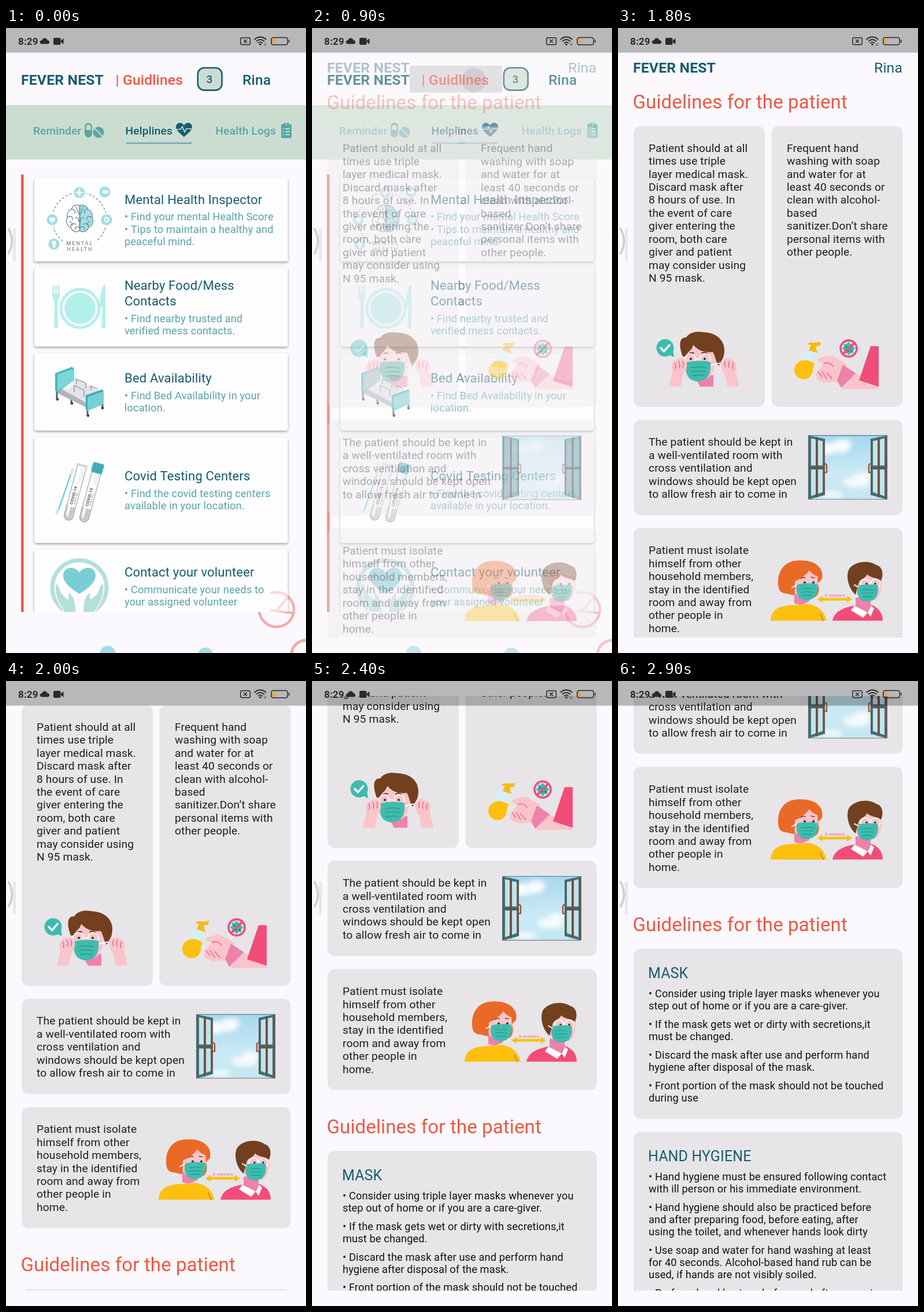
An HTML page with a canvas for the animation above (3000 ms loop, 519 px wide and 1079 px high).

```html
<!DOCTYPE html>
<html lang="en">
<head>
<meta charset="utf-8">
<title>Care app guidelines</title>
<style>
html, body { margin: 0; width: 100%; height: 100%; overflow: hidden; background: #fbf9fd; }
canvas { display: block; width: 519px; height: 1079px; }
</style>
</head>
<body>
<canvas id="stage" width="519" height="1079"></canvas>
<script>
const W = 519, H = 1079, LOOP = 3000;
const BG = '#fbf9fd', NAVY = '#175c72', TEAL = '#5aa5a6', RED = '#ef5744', BAND = '#cbddd0';
const SKIN = '#fbc4ca', HAIR = '#72401f', MASK = '#3fbcae', PINK = '#f24d79', BLUSH = '#ee82ab', YELLOW = '#fdc00f';
const BRAND = 'FEVER NEST', USER = 'Rina';
const c = document.getElementById('stage').getContext('2d');

function text(s, x, cy, size, color, weight = 400, align = 'left', gap = 0.13) {
  c.font = `${weight} ${size}px Roboto, sans-serif`;
  c.letterSpacing = gap + 'px';
  c.textAlign = align;
  c.fillStyle = color;
  c.fillText(s, x, cy + size * 0.355);
}
function lines(list, x, cy, step, size, color) {
  list.forEach((s, i) => text(s, x, cy + i * step, size, color));
}
function fill(d, color) { c.fillStyle = color; c.fill(new Path2D(d)); }
function line(d, color, w = 1) {
  c.strokeStyle = color;
  c.lineWidth = w;
  c.lineCap = c.lineJoin = 'round';
  c.stroke(new Path2D(d));
}
function disc(x, y, r, color, ry = r) {
  c.fillStyle = color;
  c.beginPath(); c.ellipse(x, y, r, ry, 0, 0, 7); c.fill();
}
function ring(x, y, r, color, w) {
  c.strokeStyle = color; c.lineWidth = w;
  c.beginPath(); c.arc(x, y, r, 0, 7); c.stroke();
}
function box(x, y, w, h, r, color) {
  c.fillStyle = color;
  c.beginPath(); c.roundRect(x, y, w, h, r); c.fill();
}
function clipped(x, y, w, h, draw) {
  c.save();
  c.beginPath(); c.rect(x, y, w, h); c.clip();
  draw();
  c.restore();
}

/* ---------- home screen ---------- */
function mental() {
  c.setLineDash([4, 3]);
  c.lineCap = 'butt';
  ring(127, 331, 47, '#75848a', 1.2);
  c.setLineDash([]);
  c.fillStyle = '#fefdff';
  c.fillRect(98, 364, 58, 24);
  [[127, 284], [171, 283], [174, 331], [80, 331], [83, 373]].forEach(([x, y]) => {
    disc(x, y, 12, '#fefdff');
    disc(x, y, 9.5, '#a6dbe3');
  });
  line('M127 279V289M122 284H132', '#fff', 3);
  box(166, 280, 11, 6, 3, '#fff');
  ring(174, 331, 3.5, '#fff', 2.4);
  fill('M80 336C72 331 75 325 80 328C85 325 88 331 80 336Z', '#fff');
  disc(83, 371, 3.8, '#fff');
  c.fillStyle = '#fff'; c.fillRect(81, 374, 4, 5);
  fill('M128 306C136 304 141 309 142 313C149 316 149 324 149 327C153 335 148 343 143 344C141 351 132 354 128 350Z', '#a5dce4');
  const half = 'M127 306C119 304 114 309 113 313C106 316 105 323 106 327C102 335 107 343 112 344C114 351 123 354 127 350Z';
  const folds = 'M113 313C118 312 121 316 119 320M106 327C111 323 116 326 115 331M112 344C111 338 117 336 121 339M121 309C125 314 123 318 126 321M109 334C114 334 115 337 115 341M120 328C124 326 126 330 126 334M120 348C118 344 122 342 126 344';
  line(half + folds, '#6d7a80', 1.2);
  c.save();
  c.translate(255, 0); c.scale(-1, 1);
  line(half + folds, '#5e8f99', 1.2);
  c.restore();
  text('MENTAL', 128, 372, 9, '#6b7478', 400, 'center', 2);
  text('HEALTH', 128, 382, 9, '#6b7478', 400, 'center', 2);
}
function plate() {
  const a = '#b3f0ec';
  ring(128, 484, 33, a, 5);
  disc(128, 484, 27, a);
  line('M82 446V463M86.500 446V463M91 446V463', a, 2.6);
  fill('M80 459H93C93 468 89 470 89 474L90 517Q86.500 521 83 517L84 474C84 470 80 468 80 459Z', a);
  fill('M171 443C164 449 162 466 163 482H167L165 516Q168 521 172 517V443Z', a);
}
function bed() {
  line('M88 625V640M118 608V622M141 655V669M167 645V657M113 637V648', '#5b6469', 3);
  fill('M90 620L119 604L167 630L141 648Z', '#e3e4e8');
  fill('M90 620L141 648V656L90 631Z', '#aeb4ba');
  fill('M92 618L107 609L122 615L106 626Z', '#f3f3f6');
  fill('M85 596L114 585L118 588V607L89 629L85 626Z', '#45b9c0');
  fill('M89 598L118 588V607L89 627Z', '#7bd5d9');
  fill('M138 634L166 624L169 627V649L141 661L138 658Z', '#3fa9b1');
  fill('M141 637L169 627V649L141 661Z', '#74d0d5');
  line('M118 628V617L135 625V636M122 614V606L138 613V622M147 625V618L158 623', '#a2a8ad', 1.8);
  [[89, 641], [142, 669], [167, 656], [114, 648]].forEach(([x, y]) => disc(x, y, 2.4, '#42494d'));
}
function tube(x, y, cap) {
  c.save();
  c.translate(x, y);
  c.rotate(0.265);
  box(-8, 0, 16, 98, [1, 1, 8, 8], '#f3f3f5');
  fill('M-8 72H8V90A8 8 0 0 1 -8 90Z', '#c9cacd');
  fill('M-5 2H-1V92Q-4 92 -5 86Z', '#fff');
  c.strokeStyle = '#9a9c9f'; c.lineWidth = 1;
  c.beginPath(); c.roundRect(-8, 0, 16, 98, [1, 1, 8, 8]); c.stroke();
  box(-6, 31, 13, 43, 1, '#fbfbfc');
  if (cap) {
    box(-10, -7, 20, 18, 3, '#48b3be');
    line('M-5 -5V9M0 -5V9M5 -5V9', '#358f9b', 1);
  } else box(-10, -2, 20, 4, 2, '#d2d4d6');
  c.rotate(-Math.PI / 2);
  text('COVID-19', -70, -1, 7, '#555', 700);
  text('sample test', -69, 4, 4, '#777');
  c.restore();
}
function tubes() {
  line('M113 768L90 834', '#6fcfd8', 2.4);
  line('M115 763L113 769M89 833L88 837', '#dde5e7', 5);
  tube(132, 755, false);
  tube(159, 758, true);
}
function volunteer() {
  ring(127, 966, 47, '#b5dfdb', 7);
  fill('M127 977C111 967 99 957 99 945C99 931 117 927 127 940C137 927 155 931 155 945C155 957 143 967 127 977Z', '#7bcdd5');
  const hand = 'M85 960C91 957 93 968 96 976L107 986C110 981 105 976 109 974C118 981 121 990 121 1014H103C99 1000 84 992 85 960Z';
  fill(hand, '#b5dfdb'); line(hand, '#fefdff', 1.5);
  c.save();
  c.translate(254, 0); c.scale(-1, 1);
  fill(hand, '#b5dfdb'); line(hand, '#fefdff', 1.5);
  c.restore();
}

const homeCards = [
  [259, 144, 296, ['Mental Health Inspector'], 326, ['• Find your mental Health Score', '• Tips to maintain a healthy and', 'peaceful mind.'], mental],
  [414, 136, 444.5, ['Nearby Food/Mess', 'Contacts'], 501.500, ['• Find nearby trusted and', 'verified mess contacts.'], plate],
  [561, 134, 604, ['Bed Availability'], 634.5, ['• Find Bed Availability in your', 'location.'], bed],
  [707, 182, 773.5, ['Covid Testing Centers'], 803.500, ['• Find the covid testing centers', 'available in your location.'], tubes],
  [900, 140, 939, ['Contact your volunteer'], 969.5, ['• Communicate your needs to', 'your assigned volunteer'], volunteer]
];

function tabIcons() {
  box(136, 164, 13, 25, 6.5, TEAL);
  box(138.5, 167, 8, 9, [4, 4, 0, 0], BAND);
  disc(160, 180, 9.5, TEAL);
  line('M153 173L167 187', BAND, 2);
  fill('M308 188C299 180 294 176 294 171C294 163 304 161 308 168C312 161 322 163 322 171C322 176 317 180 308 188Z', NAVY);
  line('M295 175H302L305 170L309 180L312 174H321', BAND, 1.7);
  box(476, 166, 18, 24, 2, TEAL);
  box(480, 164, 10, 6, 2, TEAL);
  disc(485, 166.500, 1.2, BAND);
  [174, 179, 184].forEach(y => line(`M480 ${y}h.1M484 ${y}h6`, BAND, 2));
}
function pie(alpha) {
  c.globalAlpha *= alpha;
  ring(468, 1004, 30, '#f6aaa8', 4.5);
  line('M439 1005L468 1006L496 1010M468 1006L486 984', '#f6aaa8', 4);
}
function home(press) {
  c.fillStyle = BG; c.fillRect(0, 0, W, H);
  disc(176, 1080, 13.5, '#a6dbea');
  disc(345, 1083, 13.500, '#a6dbea');
  ring(519, 1082, 25, '#f6aaa8', 5);
  clipped(430, 1008, 89, 40, () => pie(1));
  clipped(487, 960, 32, 48, () => pie(0.9));

  if (press > 0) {
    c.fillStyle = `rgba(0,0,0,${0.155 * press})`;
    c.fillRect(169, 65, 160, 46.5);
  }
  text(BRAND, 26, 89, 24.8, NAVY, 700);
  text('| Guidlines', 189.500, 89, 24.600, RED, 500);
  if (press > 0) disc(280, 90, 21, `rgba(0,0,0,${0.13 * press})`);
  c.fillStyle = BAND; c.strokeStyle = NAVY; c.lineWidth = 2.6;
  c.beginPath(); c.roundRect(331.8, 68.8, 41.8, 38.6, 11); c.fill(); c.stroke();
  text('3', 352, 88.500, 18.5, NAVY, 500, 'center');
  text(USER, 409, 89, 24.600, NAVY, 500);

  c.fillStyle = BAND; c.fillRect(0, 133, W, 94);
  text('Reminder', 47, 177, 19.2, TEAL, 500);
  text('Helplines', 206.500, 177, 19.2, NAVY, 500);
  text('Health Logs', 362.500, 177, 19.2, TEAL, 500);
  c.fillStyle = '#76a9b9'; c.fillRect(207.500, 197.5, 113.5, 2.6);
  tabIcons();

  clipped(0, 227, W, 781, () => {
    c.fillStyle = RED; c.fillRect(26, 253, 4.5, 755);
    homeCards.forEach(([y, h, ty, title, dy, desc, art]) => {
      c.save();
      c.shadowColor = 'rgba(0,0,0,.36)'; c.shadowBlur = 4; c.shadowOffsetY = 2;
      box(49, y, 438.5, h, 4, '#fefdff');
      c.restore();
      art();
      lines(title, 205, ty, 26.4, 22.1, NAVY);
      lines(desc, 205, dy, 21.2, 18.2, TEAL);
    });
    clipped(458, 960, 29, 48, () => pie(0.45));
  });
}

/* ---------- guideline artwork ---------- */
function faceMask(x, y, s = 1) {
  c.save();
  c.translate(x, y); c.scale(s, s);
  fill('M-21 -15Q0 -20 21 -16Q23 6 12 14Q-2 22 -15 13Q-24 4 -21 -15Z', MASK);
  line('M-12 -6Q0 -8 12 -6M-12 1Q0 -1 12 1M-10 8Q0 6 10 8', '#259d92', 1.6);
  c.restore();
}
function glasses(x1, x2, y, r) {
  ring(x1, y, r, '#fff', 1.8); ring(x2, y, r, '#fff', 1.8);
  line(`M${x1 + r} ${y}H${x2 - r}`, '#fff', 1.6);
}
function masked() {
  disc(81.5, 553, 15, '#3dbbb0');
  fill('M86 564L97 569L95 556Z', '#3dbbb0');
  line('M74 553L79.500 559L89 548', '#fff', 3.4);
  fill('M131 600H165V620H142Z', BLUSH);
  fill('M116 560Q140 540 167 560Q173 588 157 604Q138 613 121 601Q112 585 116 560Z', SKIN);
  fill('M112 568C104 546 107 534 118 535C124 525 137 524 149 526C174 527 190 545 182 570L174 584C169 578 169 568 164 560C145 562 137 555 130 548C129 557 119 559 118 568Z', HAIR);
  line('M123 563Q127 560 131 562M145 562Q150 559 155 563', '#4a2a18', 1.8);
  glasses(125, 151, 572, 9);
  disc(126, 572, 2, '#333'); disc(150, 572, 2, '#333');
  line('M118 583L107 579M160 583L176 579', '#fff', 2);
  faceMask(139, 593);
  const hand = 'M88 620L94 594C90 582 96 573 104 572C114 567 121 577 119 586C118 594 113 596 112 602L109 620Z';
  const folds = 'M98 579Q101 583 99 589M105 576Q108 581 106 587M112 576Q115 581 112 586';
  fill(hand, SKIN); line(folds, '#e0608a', 1.4);
  c.save();
  c.translate(298, 0); c.scale(-1, 1);
  fill(hand, SKIN); line(folds, '#e0608a', 1.4);
  c.restore();
}
function washing() {
  disc(321, 591, 16, YELLOW);
  fill('M318 577L335 580L338 570L345 561L320 557Z', '#d4eff8');
  fill('M314 576Q327 571 340 580L337 589Q322 585 311 585Z', YELLOW);
  fill('M330 557L334 548L328 547Q330 542 338 544L351 543L350 549L342 551L345 562Z', '#f6ba12');
  ring(399, 554, 14, PINK, 3.6);
  disc(399, 554, 9, MASK);
  for (let i = 0; i < 8; i++) disc(399 + 9 * Math.cos(i * 0.785), 554 + 9 * Math.sin(i * 0.785), 2, MASK);
  [[395, 551], [402, 552], [398, 558], [404, 558]].forEach(([x, y]) => disc(x, y, 1.8, '#237f82'));
  line('M389 564L409 544', PINK, 3.6);
  fill('M346 572C355 569 368 562 378 571L396 581L382 612C368 609 360 616 351 610C342 608 341 600 345 594L356 579Q345 579 346 572Z', SKIN);
  line('M346 594L353 603M353 594L361 606M361 596L370 606M356 580Q367 576 372 585', '#e06f93', 1.6);
  fill('M389 582L412 597L386 622L379 609Z', BLUSH);
  fill('M411 597L426 606L451 613V624H386Z', SKIN);
  fill('M437 550H451V620L417 609Z', PINK);
}
function shutter() {
  fill('M329 704L358 710V807L329 815Z', '#3f7178');
  line('M331 706V813M357 711V806', '#7a4e40', 1.6);
  fill('M334 709L342 711V756H334ZM334 763H342V806L334 809ZM346 712L354 714V756H346ZM346 763H354V802L346 805Z', '#c7e1e6');
  line('M331 760H357M344 708V810', '#6f4b40', 2.4);
  line('M358 753Q362 753 361 760V768H358', '#9c5438', 2.4);
}
function windowArt() {
  const sky = c.createLinearGradient(0, 704, 0, 815);
  sky.addColorStop(0, '#a6d8ef'); sky.addColorStop(0.6, '#cbeaf5'); sky.addColorStop(1, '#c3e6f2');
  clipped(329, 703.5, 137, 111.5, () => {
    c.fillStyle = sky; c.fillRect(329, 703, 137, 113);
    c.save();
    c.filter = 'blur(4px)';
    [[375, 725, 25, 10], [390, 719, 14, 9], [358, 729, 14, 8], [412, 785, 23, 9], [423, 776, 14, 8], [370, 806, 20, 6]].forEach(([x, y, a, b]) => disc(x, y, a, 'rgba(255,255,255,.8)', b));
    c.restore();
    shutter();
    c.save();
    c.translate(795, 0); c.scale(-1, 1);
    shutter();
    c.restore();
    line('M329 704H466', '#55828a', 1.6);
    line('M329 814.5H466', '#8b6c5d', 1.4);
  });
}
function distance() {
  fill('M264 1024C265 1003 281 998 302 997L331 995C351 1001 357 1010 361 1024Z', YELLOW);
  line('M350 1012L355 1024', '#ad7220', 1.2);
  fill('M277 960C276 933 293 919 315 920C341 919 357 933 353 952L346 959C349 974 347 977 342 983C330 982 302 981 292 977C280 977 277 969 277 960Z', '#e96a26');
  fill('M305 970H331V990Q318 999 305 994Z', BLUSH);
  fill('M306 956Q322 950 331 937Q337 945 345 947Q348 977 337 985Q314 990 306 975Z', SKIN);
  line('M316 951Q320 948 324 950M334 949L340 950', '#85442a', 1.5);
  disc(323, 958, 2, '#333'); disc(338, 958, 2, '#333');
  faceMask(327, 974, 0.84);
  line('M309 962L301 967', '#fff', 1.8);

  line('M352 987H398', YELLOW, 4.5);
  fill('M345 987L354 981V993ZM405 987L396 981V993Z', YELLOW);
  c.save();
  c.translate(375, 980); c.scale(1, 0.8);
  text('3 meters', 0, 0, 9, '#ee8fa5', 700, 'center', 0);
  c.restore();

  fill('M371 1024C374 1008 390 1001 409 998L439 997C453 1003 458 1013 458 1024Z', PINK);
  fill('M411 984H437V1000L430 1011L411 1000Z', BLUSH);
  fill('M409 998L403 1006L424 1019L432 1010ZM438 998L443 1003L437 1017L432 1010Z', '#fff');
  fill('M407 946Q430 936 455 950Q458 980 445 988Q423 993 412 978Z', SKIN);
  fill('M411 979C395 965 394 939 402 932C414 920 436 920 447 928C458 930 460 945 455 955C447 949 438 951 431 944C428 952 418 951 416 960Z', HAIR);
  glasses(428, 445, 960, 8);
  disc(430, 960, 1.8, '#333'); disc(445, 960, 1.8, '#333');
  faceMask(432, 976, 0.84);
  line('M416 966L409 962', '#fff', 1.8);
}

/* ---------- guideline screen ---------- */
const rules = [
  [53, 207.500, ['Patient should at all', 'times use triple', 'layer medical mask.', 'Discard mask after', '8 hours of use. In', 'the event of care', 'giver entering the', 'room, both care', 'giver and patient', 'may consider using', 'N 95 mask.']],
  [292, 207.5, ['Frequent hand', 'washing with soap', 'and water for at', 'least 40 seconds or', 'clean with alcohol-', 'based', 'sanitizer.Don’t share', 'personal items with', 'other people.']],
  [53, 715, ['The patient should be kept in', 'a well-ventilated room with', 'cross ventilation and', 'windows should be kept open', 'to allow fresh air to come in']],
  [53, 902, ['Patient must isolate', 'himself from other', 'household members,', 'stay in the identified', 'room and away from', 'other people in', 'home.']]
];
const panels = [[27, 170, 227, 485], [265.500, 170, 227, 485], [27, 677, 465.5, 164.5], [27, 864, 465.5, 209], [27, 1178, 465.5, 294], [27, 1494, 465.5, 400]];
const lists = [
  ['MASK', 1219.500, [
    ['• Consider using triple layer masks whenever you', 'step out of home or if you are a care-giver.'],
    ['• If the mask gets wet or dirty with secretions,it', 'must be changed.'],
    ['• Discard the mask after use and perform hand', 'hygiene after disposal of the mask.'],
    ['• Front portion of the mask should not be touched', 'during use']]],
  ['HAND HYGIENE', 1535.5, [
    ['• Hand hygiene must be ensured following contact', 'with ill person or his immediate environment.'],
    ['• Hand hygiene should also be practiced before', 'and after preparing food, before eating, after', 'using the toilet, and whenever hands look dirty'],
    ['• Use soap and water for hand washing at least', 'for 40 seconds. Alcohol-based hand rub can be', 'used, if hands are not visibly soiled.'],
    ['• Perform hand hygiene before and after removing']]]
];

function guide(scroll) {
  c.fillStyle = BG; c.fillRect(0, 0, W, H);
  clipped(0, 26, W, 1026.5, () => {
    c.translate(0, -scroll);
    text(BRAND, 26, 68.5, 24.8, NAVY, 700);
    text(USER, 492, 68.5, 24.8, NAVY, 400, 'right');
    [128, 1136].forEach(y => text('Guidelines for the patient', 25.5, y, 33, RED));
    panels.forEach(([x, y, w, h]) => box(x, y, w, h, 12, '#e7e5e8'));
    rules.forEach(([x, y, list]) => lines(list, x, y, 22.45, 19.2, '#1d1c1e'));
    masked(); washing(); windowArt(); distance();
    lists.forEach(([title, y, items]) => {
      text(title, 52, y, 25, NAVY);
      let cy = y + 35.5;
      items.forEach(list => {
        lines(list, 53, cy, 21.15, 18.2, '#121113');
        cy += list.length * 21.15 + 10.6;
      });
    });
  });
}

/* ---------- system overlay ---------- */
function system() {
  const ink = '#2b292c';
  c.fillStyle = 'rgba(0,0,0,.265)'; c.fillRect(0, 0, W, 42.5);
  text('8:29', 21, 23, 17, ink, 700);
  fill('M62 27.500C57 27 58 21 62.500 21C64 16 71 17 71.500 21C76 21 76.500 27 72.500 27.500Z', ink);
  box(82, 17, 12.5, 12, 2, ink);
  fill('M95 21.500L99.500 18V28L95 24.500Z', ink);
  c.strokeStyle = ink; c.lineWidth = 1.5;
  c.beginPath(); c.roundRect(405.8, 16.8, 16.5, 12, 2.500); c.stroke();
  line('M411.500 20.300L416.500 25.300M416.500 20.300L411.500 25.300', ink, 1.5);
  [[13.5, 2], [9, 2], [4.5, 2]].forEach(([r, w]) => {
    c.strokeStyle = ink; c.lineWidth = w;
    c.beginPath(); c.arc(440, 29, r, -2.36, -0.78); c.stroke();
  });
  disc(440, 28.5, 1.700, ink);
  line('M447 27V30M449.500 27V30', ink, 0.8);
  c.strokeStyle = ink; c.lineWidth = 1.6;
  c.beginPath(); c.roundRect(458.800, 16.5, 28.5, 12.500, 3.5); c.stroke();
  box(461, 18.700, 4.5, 8, 1, '#f6a623');
  c.fillStyle = ink; c.fillRect(489, 20.5, 1.600, 4.500);
  box(12, 346, 5, 57, 2, 'rgba(120,118,122,.13)');
  line('M4.500 347Q16 368 4.500 389', 'rgba(205,203,206,.9)', 4);
}

const clamp = v => Math.min(1, Math.max(0, v));
const track = [[1800, 0], [2000, 128], [2400, 366], [2600, 518], [2900, 715], [3000, 780]];
function scrollAt(t) {
  for (let i = 1; i < track.length; i++) {
    const [t0, y0] = track[i - 1], [t1, y1] = track[i];
    if (t < t1) return y0 + (y1 - y0) * clamp((t - t0) / (t1 - t0));
  }
  return 780;
}
function render(t) {
  const enter = clamp((t - 850) / 150);
  c.globalAlpha = 1;
  if (enter < 1) home(clamp((t - 500) / 100));
  if (enter > 0) {
    c.save();
    c.globalAlpha = enter;
    guide(scrollAt(t));
    c.restore();
  }
  system();
}
const start = performance.now();
function tick() {
  render((performance.now() - start) % LOOP);
  requestAnimationFrame(tick);
}
tick();
</script>
</body>
</html>
```
